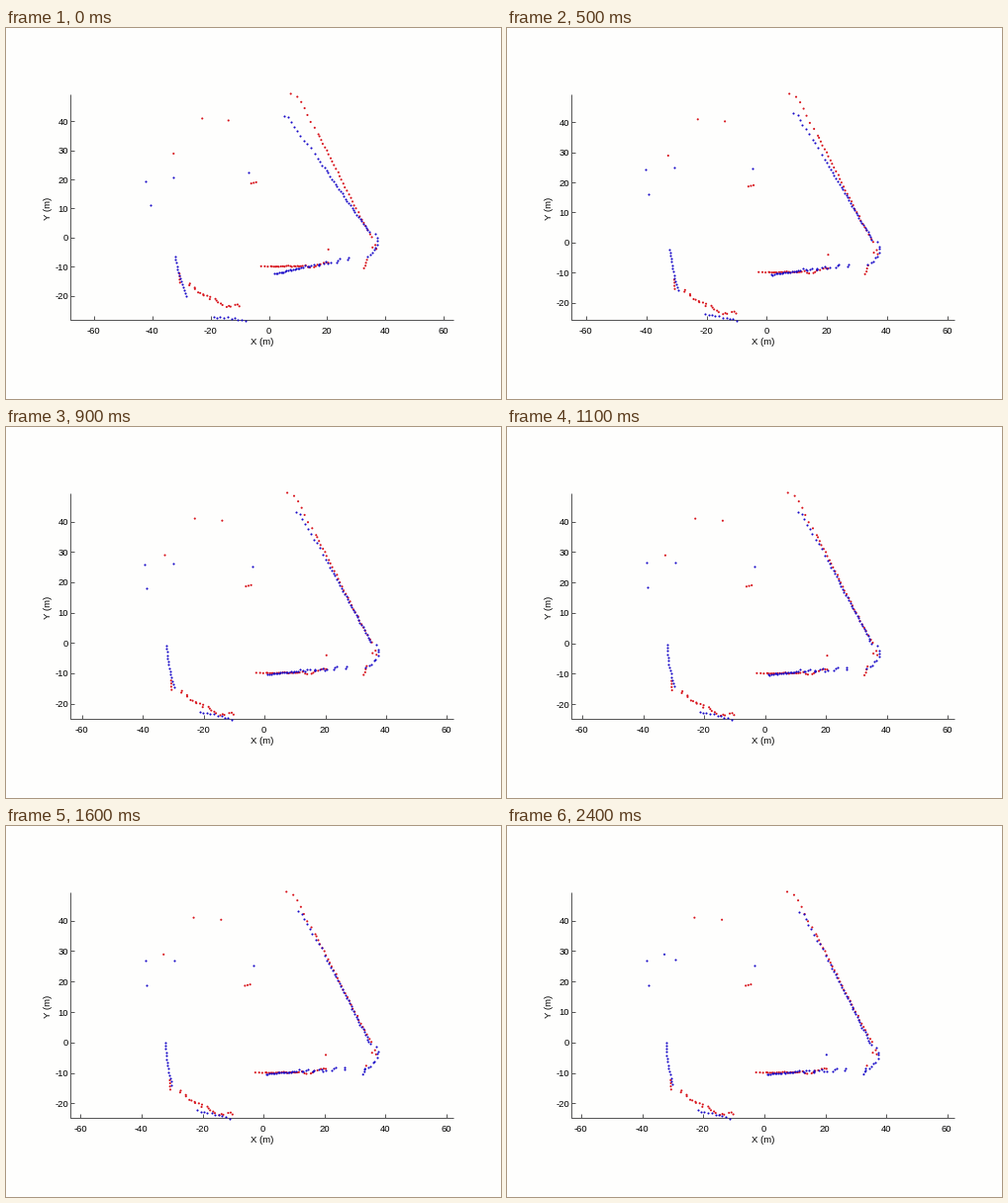
Write a matplotlib script that moves like this. It is 500x375 px and loops after 2.6 s.

```python
import numpy as np
import matplotlib.pyplot as plt
from matplotlib.animation import FuncAnimation

W, H, DPI = 500, 375, 100
LEFT, RIGHT, TOP, BOTTOM = 65, 452.5, 66, 295.3
BASE = 294.2
RED, BLUE = "#d8141c", "#180ac8"
LINE, PAPER = "#585858", "#fefefd"
FRAMES, LAST = 26, 24

plt.rcParams["font.family"] = "Liberation Sans"
rng = np.random.default_rng(4)


def trail(keys, n, jitter=0.3, ease=1.0):
    """n noisy points spread along the path through the keys."""
    keys = np.array(keys, float)
    steps = np.hypot(*np.diff(keys, axis=0).T)
    dist = np.r_[0, np.cumsum(steps)]
    at = dist[-1] * np.linspace(0, 1, n) ** ease
    path = np.column_stack([np.interp(at, dist, c) for c in keys.T])
    noise = rng.normal(0, jitter, (n, 2))
    noise[[0, -1]] = 0
    return path + noise


def metres(*parts):
    """Join groups of points on the drawing grid and convert to metres."""
    p = np.vstack([np.asarray(q, float) for q in parts])
    return (p - (266, 211.5)) * (1, -1) / 2.942


def rot(deg):
    c, s = np.cos(np.radians(deg)), np.sin(np.radians(deg))
    return np.array([[c, -s], [s, c]])


# Reference scan; its first two groups turn blue once matched.
ref = metres(
    [(169.5, 126.5), (326, 223.5)],
    trail([(364, 237), (362, 242.5)], 3),
    [(198.5, 91), (225, 93), (365, 234)],
    trail([(248, 156.7), (253, 155.5)], 3, 0),
    trail([(288, 66), (297, 69), (309, 97), (316, 107)], 8),
    trail([(317, 109), (355, 184), (370, 211)], 29),
    trail([(373.5, 219), (371, 222), (374.5, 223)], 3),
    trail([(258, 240.5), (268, 240.5)], 4),
    trail([(269, 240.7), (300, 240.2)], 18),
    trail([(303, 239.5), (311, 241.5), (318, 238), (326, 237)], 10, 0.8),
    trail([(175.5, 248), (176, 257)], 4),
    trail([(186, 258), (193, 266), (212, 274), (220, 280.5), (236, 281)],
          22, 0.8),
)
MATCHED = [(slice(0, 2), 18), (slice(2, 5), 15)]

# Moving scan in its starting pose.
scan = metres(
    [(141.5, 155), (146, 178.5), (169, 151), (245.5, 145.5)],
    trail([(281, 88.5), (284, 87.5), (297, 107.5), (308, 120.5)], 9, 0.5),
    trail([(312, 127), (367, 206)], 32, ease=0.85),
    trail([(373, 208), (376, 219), (370, 227), (365, 231)], 9, 0.5),
    trail([(346, 232), (345.7, 234)], 2),
    trail([(337, 233), (334, 236.5)], 3),
    trail([(271.5, 248), (298, 242)], 18),
    trail([(300, 241.5), (328, 237)], 13, 0.8),
    trail([(171, 231), (175, 250.5), (182.5, 270.5)], 14, 0.1),
    trail([(210, 291.5), (225, 292.3), (242, 295.5)], 10, 0.5),
)

TURN, SHIFT = 8.0, np.array([-0.4, -2.1])
settled = (scan - SHIFT) @ rot(-TURN).T


def pose(n):
    """Scan after n matching steps, converging on its settled pose."""
    turn = TURN * np.exp(-0.15 * n - 0.0027 * n * n)
    shift = (SHIFT[0] * np.exp(-0.25 * n),
             (SHIFT[1] + 0.31 * n) * np.exp(-0.17 * n))
    return settled @ rot(turn).T + shift


fig = plt.figure(figsize=(W / DPI, H / DPI), dpi=DPI, facecolor=PAPER)
ax = fig.add_axes([0, 0, 1, 1])
ax.set_xlim(0.5, W + 0.5)
ax.set_ylim(H - 0.5, -0.5)
ax.axis("off")


def stroke(xs=(), ys=()):
    return ax.plot(xs, ys, color=LINE, lw=0.72, solid_capstyle="butt")[0]


def label(x, y, text, **kw):
    kw = {"ha": "center", "va": "center", **kw}
    return ax.text(x, y, text, fontsize=9.5 * 72 / DPI, color="black", **kw)


stroke([LEFT, LEFT, RIGHT], [TOP, BASE, BASE])
label(259.5, 317.5, "X (m)")
label(43, 181.5, "Y (m)", rotation=90)

x_ticks = [(v, stroke(), label(0, 305.7, f"{v}")) for v in range(-60, 61, 20)]
y_ticks = [(v, stroke(), label(63.5, 0, f"{v}", ha="right"))
           for v in range(-20, 41, 10)]

dot = dict(s=(2.1 * 72 / DPI) ** 2, linewidths=0)
ref_dots = ax.scatter(*ref.T, zorder=3, **dot)
scan_dots = ax.scatter(*scan.T, color=BLUE, zorder=4, **dot)


def draw(i):
    n = min(i, LAST)
    pts = pose(n)
    both = np.vstack([ref, pts])
    lo, hi = both.min(0), both.max(0)

    # Equal axes that fit the data's height and centre its width.
    k = (BOTTOM - TOP) / (hi[1] - lo[1])
    x0 = (LEFT + RIGHT) / 2 - k * (lo[0] + hi[0]) / 2
    y0 = TOP + k * hi[1]

    for dots, p in ((ref_dots, ref), (scan_dots, pts)):
        dots.set_offsets(p * (k, -k) + (x0, y0))
    colors = np.full(len(ref), RED)
    for group, start in MATCHED:
        if n >= start:
            colors[group] = BLUE
    ref_dots.set_facecolor(colors.tolist())

    for v, tick, text in x_ticks:
        x = x0 + k * v
        tick.set_data([x, x], [BASE - 4, BASE])
        text.set_x(x - 0.5)
    for v, tick, text in y_ticks:
        y = y0 - k * v
        tick.set_data([LEFT, LEFT + 4], [y, y])
        text.set_y(y + 1)


anim = FuncAnimation(fig, draw, frames=FRAMES, interval=100, repeat=True,
                     repeat_delay=0, init_func=lambda: draw(0))
plt.show()
```
